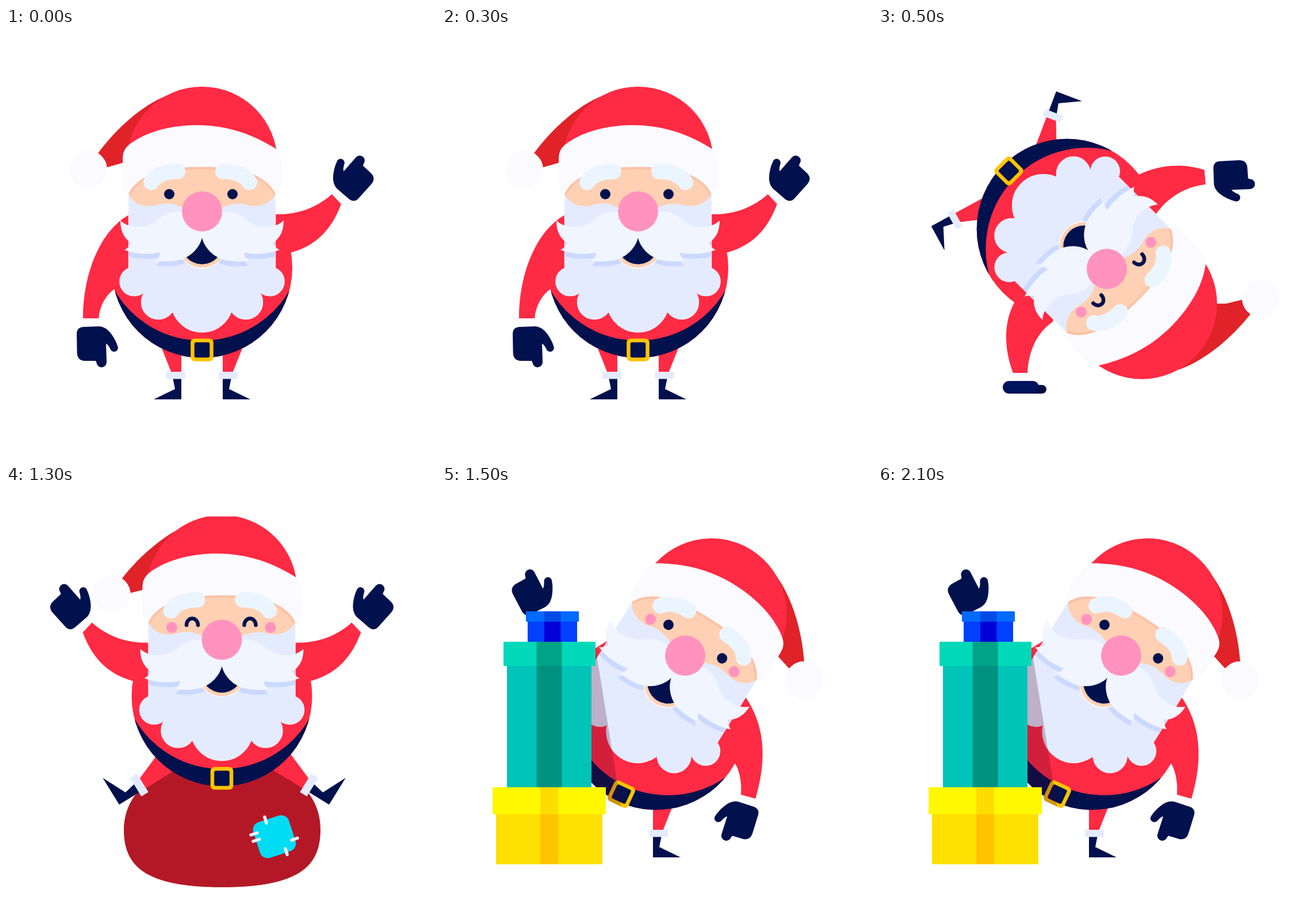
Recreate the animation shown at these times as an HTML page with a canvas. Size 748 by 748 pixels, loop 2500 ms.

```html
<!DOCTYPE html>
<html lang="en">
<head>
<meta charset="utf-8">
<title>Santa poses</title>
<style>
  html, body { margin: 0; height: 100%; overflow: hidden; background: #fff; }
  canvas { display: block; width: 100vw; height: 100vh; }
</style>
</head>
<body>
<canvas id="stage" width="748" height="748"></canvas>
<script>
const ctx = document.getElementById('stage').getContext('2d');
const RED = '#ff2a43', DARK_RED = '#e02229', NAVY = '#00114d', SNOW = '#fbfaff';
const BEARD = '#e4ebff', TACHE = '#f0f5ff', SHADE = '#cbd9ff', BROW = '#ebf5ff';
const SKIN = '#ffd0b3', SKIN_SHADE = '#fbc1a5', PINK = '#ff93be', GOLD = '#ffc400';

// Place a part: its own point (ox, oy) lands on (x, y), turned and optionally mirrored.
function at(x, y, deg, flip, ox, oy, draw) {
  ctx.save();
  ctx.translate(x, y);
  ctx.rotate(deg * Math.PI / 180);
  ctx.scale(flip, 1);
  ctx.translate(-ox, -oy);
  draw();
  ctx.restore();
}
const mirror = (axis, draw) => { draw(); at(axis, 0, 0, -1, axis, 0, draw); };

function fill(d, color) {
  ctx.fillStyle = color;
  ctx.fill(typeof d === 'string' ? new Path2D(d) : d);
}
function line(d, color, width) {
  ctx.strokeStyle = color;
  ctx.lineWidth = width;
  ctx.lineCap = 'round';
  ctx.stroke(typeof d === 'string' ? new Path2D(d) : d);
}
function disc(x, y, r, color) {
  ctx.fillStyle = color;
  ctx.beginPath();
  ctx.arc(x, y, r, 0, 7);
  ctx.fill();
}
function rect(x, y, w, h, color, r = 0) {
  ctx.fillStyle = color;
  ctx.beginPath();
  ctx.roundRect(x, y, w, h, r);
  ctx.fill();
}
function clipped(path, draw) {
  ctx.save();
  ctx.clip(path);
  draw();
  ctx.restore();
}

const HAND = 'M123 532Q123 521 134 520L163 519Q174 520 183 532Q191 543 194 553' +
  'A6.8 6.8 0 0 1 182 559.5Q178 551 174 549L175 581A8.7 8.7 0 0 1 157.500 582L156 579' +
  'L136 579Q124 578 123.600 565Z';
const CONE = 'M160 218C190 177 235 135 281 117L330 230L203 234.5L177 242L143 246Z';
const BRIM_EDGE = 'M469 289C452 252 400 241.5 341 241.5C282 241.5 230 252 213 289';
const BRIM = BRIM_EDGE + 'Q203 286 203 274L203 226Q203 212 214 203C245 179 290 169 333 169' +
  'C385 169 430 185 471 211Q481 225 480 250L480 270Q479 283 469 289Z';
const FACE = new Path2D('M213 287C220 306 240 314 262 308S295 307 312 315L341 325L370 315' +
  'C387 307 402 303 420 308S462 306 469 287C447 246 400 238 341 238S235 246 213 287Z');
const TACHE_HALF = 'M341 365C336 385 318 400 300 404Q280 408 260 405Q267 400 268 391' +
  'Q235 397 206 386Q214 382 218 374C203 364 199 350 199 335C215 350 245 350 265 333' +
  'C280 319 300 316 320 322L342 330L342 362Z';
// Belt area: everything outside the circle that ends the coat.
const BELT = new Path2D('M180 250H502V580H180Z');
BELT.arc(341, 368, 176, 0, 2 * Math.PI);

const beard = new Path2D('M213.500 286L468.500 286L468.500 441L417 477L341 500L265 477L213.500 441Z');
for (const [x, y, r] of [[223, 441, 25], [265, 477, 29.5], [341, 475, 54], [417, 477, 29.5], [459, 441, 25]]) {
  beard.moveTo(x + r, y);
  beard.arc(x, y, r, 0, 2 * Math.PI);
}

const hand = (x, y, deg, flip) => at(x, y, deg, flip, 187, 555, () => fill(HAND, NAVY));

function leg(x, y, deg, flip, size = 1) {
  at(x, y, deg, flip, 0, 0, () => {
    ctx.scale(size, size);
    ctx.translate(-295.5, -604);
    fill('M244 490L305 490L305 600L288 600Z', RED);
    fill('M290 608L305 608L305 646L257 646L294 628Z', NAVY);
    rect(279, 598, 33, 12.5, BEARD);
  });
}

function body(x, y, deg) {
  at(x, y, deg, 1, 341, 417, () => {
    const round = new Path2D();
    round.arc(341, 417, 157, 0, 7);
    fill(round, RED);
    clipped(round, () => {
      ctx.beginPath();
      ctx.rect(180, 440, 330, 140);
      ctx.clip();
      ctx.fillStyle = NAVY;
      ctx.fill(BELT, 'evenodd');
    });
    rect(321.2, 540.2, 39.6, 39.6, GOLD, 7);
    rect(327.7, 546.7, 26.6, 26.6, NAVY, 3);
  });
}

function hat(tilt, pull) {
  at(341 + pull, 221, tilt, 1, 341, 221, () => {
    fill(CONE, DARK_RED);
    disc(143, 246, 33, SNOW);
  });
  disc(341, 233, 131, RED);
}

function eyes(smile, cheeks) {
  if (smile) {
    for (const x of [289.5, 390]) line(`M${x - 10} 293.5A10 11.5 0 0 1 ${x + 10} 293.5`, NAVY, 6.5);
  } else {
    disc(284, 289, 9, NAVY);
    disc(394, 289, 9, NAVY);
  }
  if (cheeks) {
    disc(254, 297.5, 9.5, PINK);
    disc(425.5, 297.5, 9.5, PINK);
  }
}

function head(x, y, deg, { flip = 1, tilt = 0, pull = 0, smile = false, cheeks = true }) {
  at(x, y, deg, flip, 341, 319, () => {
    hat(tilt, pull);
    line(beard, '#f6f6ff', 1.5);
    fill(beard, BEARD);
    fill(FACE, SKIN);
    clipped(FACE, () => line(BRIM_EDGE, SKIN_SHADE, 8));
    fill(BRIM, SNOW);
    clipped(beard, () => {
      ctx.translate(0, 8.5);
      mirror(341, () => fill(TACHE_HALF, SHADE));
    });
    disc(341, 376, 42.5, '#fff');
    disc(341, 376, 41.2, SKIN);
    disc(341, 375, 36, NAVY);
    mirror(341, () => fill(TACHE_HALF, TACHE));
    eyes(smile, cheeks);
    mirror(338, () => line('M252.500 268.500Q266 249 298.500 249.500', BROW, 27));
    disc(341, 319, 35, PINK);
  });
}

function raisedArm() {
  fill('M430 320L470 324C507 325 540 313 567 289L583 306C567 350 540 378 498 390L440 400Z', RED);
  fill('M567 289L574 282L591 299L583 306Z', SNOW);
  hand(582, 236, -137, 1);
}

function wave() {
  mirror(341, () => leg(295.5, 604, 0, 1));
  raisedArm();
  fill('M214 325C165 352 134 425 134 506L161 506C163 483 173 465 190 453L260 400Z', RED);
  rect(131, 505, 30, 15, SNOW);
  hand(187, 555, 0, 1);
  body(341, 417, 0);
  head(341, 319, 0, { cheeks: false });
}

function handstand() {
  leg(304, 153, 200.7, 1);
  leg(134, 333, 61.3, -1);
  fill('M450 257C485 238 530 234 568 247L570 272C535 276 505 294 484 323L400 330Z', RED);
  fill('M568 247L583 243L585 273L570 272Z', SNOW);
  hand(622, 294, -94, -1);
  fill('M238 476C218 512 219 557 235 600L260 600C262 562 276 530 304 511L320 440Z', RED);
  rect(235, 600, 25, 14, SNOW);
  rect(262, 621, 31, 15, '#000b40', 7.5);
  rect(217, 614, 63, 22, '#00125c', 11);
  body(328.7, 349.7, 135);
  head(398, 419, 135, { tilt: 47, smile: true });
}

function sack() {
  fill('M205 598C205 660 240 698 376 698S547 660 547 598S500 480 376 480S205 540 205 598Z', '#b41827');
  at(467, 610, -18, 1, 0, 0, () => rect(-32.5, -32.5, 65, 65, '#00dcf4', 14));
  line('M450 576L453 586M426 607L437 603.5M430 618L441 614.5M497 616L507 612.5M486 631L489 641', '#f0f0ff', 5.5);
}

function onSack() {
  ctx.beginPath();
  ctx.rect(0, 53, 748, 695);
  ctx.clip();
  sack();
  mirror(379.5, () => leg(232, 520, 58.3, 1, 1.14));
  at(375.5, 268, 0, 1, 341, 319.5, () => mirror(341, raisedArm));
  body(375.5, 365.5, 0);
  head(375.5, 267.5, 0, { tilt: 1.7, pull: 7, smile: true });
}

// Gift: lid and box share one ribbon; each row is [x, y, w, h, colour, ribbon colour].
function gift(ribbonX, ribbonW, ...rows) {
  for (const [x, y, w, h, color, ribbon] of rows) {
    rect(x, y, w, h, color);
    rect(ribbonX, y, ribbonW, h, ribbon);
  }
}

function gifts() {
  gift(178, 28.5, [146, 218, 92, 18, '#006aff', '#004be6'], [149, 236, 86, 35, '#0040ff', '#0000d6']);
  gift(164.5, 44, [107, 271, 160, 42, '#00d8ba', '#00a386'], [113, 313, 147, 211, '#00c4b8', '#00917f']);
  gift(171, 31, [88, 524, 197, 47, '#fff800', '#ffdc00'], [94, 571, 185, 87, '#ffe000', '#ffc400']);
}

function peek() {
  leg(376.5, 604, 0, -1);
  fill('M290 268L200 323L250 400L320 300Z', RED);
  fill('M526 364C562 415 566 475 545 545L520 537C522 515 517 492 508 480L440 420Z', RED);
  fill('M520 537L549 545L545 557L516 549Z', SNOW);
  hand(482, 577, 16, -1);
  body(372.4, 406.4, 25);
  head(423, 295, 32, { flip: -1 });
  ctx.globalCompositeOperation = 'source-atop';
  fill('M250 288L268 288L312 560L250 560Z', 'rgba(75,0,40,.25)');
  ctx.globalCompositeOperation = 'source-over';
  hand(184, 167, 151, -1);
  gifts();
}

const poses = [wave, handstand, onSack, peek];

function tick() {
  const t = performance.now() % 2500;
  ctx.clearRect(0, 0, 748, 748);
  ctx.save();
  poses[Math.min(3, Math.floor(t / 500))]();
  ctx.restore();
  requestAnimationFrame(tick);
}
tick();
</script>
</body>
</html>
```
